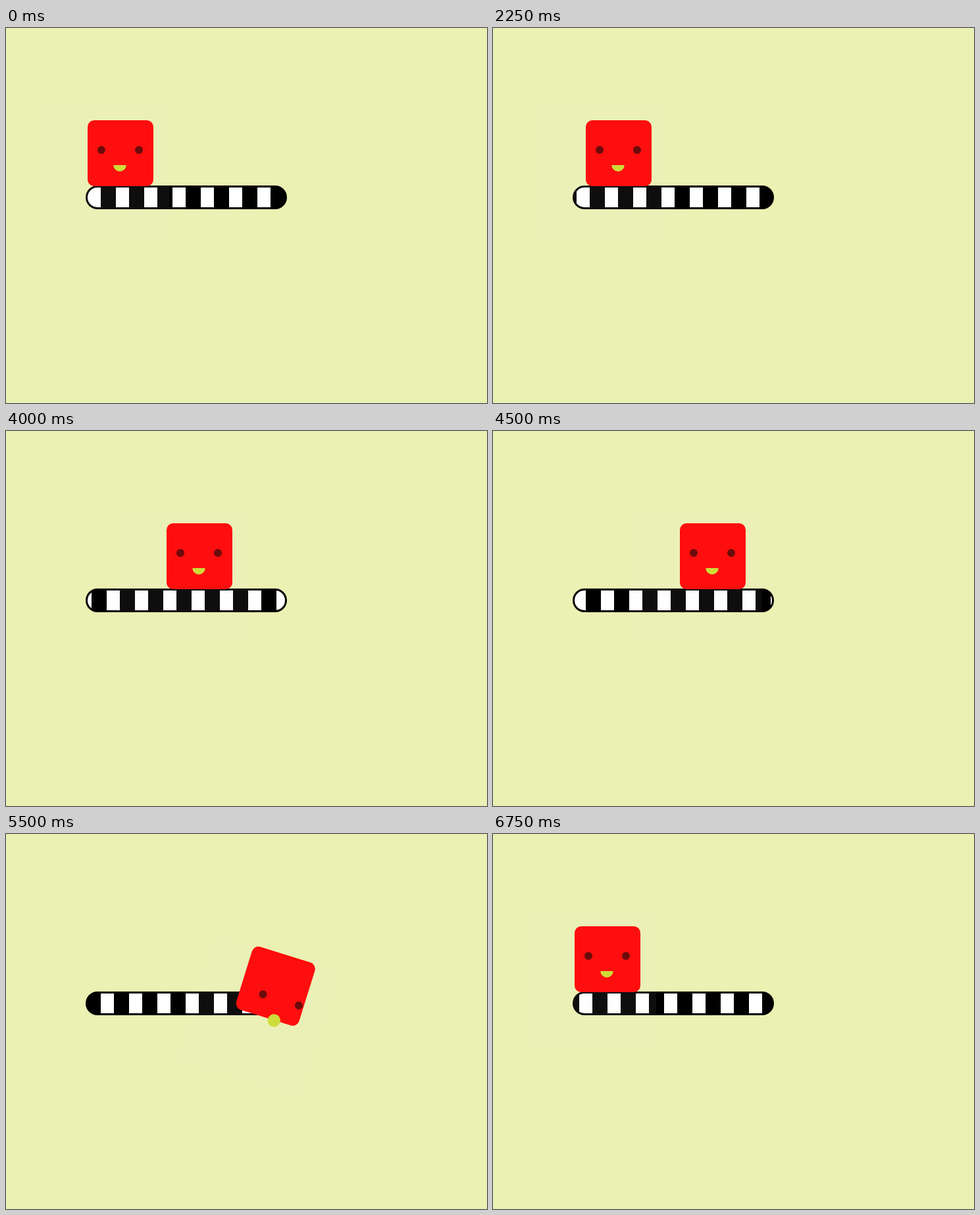
These frames come from a looping animation (731x569 px, 7000 ms). An HTML page with a canvas:

```html
<!DOCTYPE html>
<html lang="en">
<head>
<meta charset="utf-8">
<title>Box on a conveyor belt</title>
<style>
  html, body { margin: 0; height: 100%; overflow: hidden; background: #ebf0b3; }
  canvas { display: block; }
</style>
</head>
<body>
<canvas width="731" height="569"></canvas>
<script>
const ctx = document.querySelector('canvas').getContext('2d');
const LOOP = 7000, STEP = 250;
const RIDE = 1400, TIP = 5000, RESET = 6330;

const clamp = v => Math.min(1, Math.max(0, v));

// cubic-bezier(.42, 0, 1, 1)
function easeIn(p) {
  let low = 0, high = 1;
  for (let i = 0; i < 24; i++) {
    const s = (low + high) / 2;
    if (1.26 * s + 0.48 * s * s - 0.74 * s ** 3 < p) low = s; else high = s;
  }
  return low * low * (3 - 2 * low);
}

function pill(x, y, w, h, r) {
  ctx.beginPath();
  ctx.roundRect(x, y, w, h, r);
}

function dot(x, y, r, color, end = 2 * Math.PI) {
  ctx.fillStyle = color;
  ctx.beginPath();
  ctx.arc(x, y, r, 0, end);
  ctx.fill();
}

function place(x, y, angle, draw) {
  ctx.save();
  ctx.translate(x, y);
  ctx.rotate(angle);
  draw();
  ctx.restore();
}

function drawBelt(t) {
  const shift = Math.floor(t < 2750 ? 0.0208 * t : 6 + 0.0232 * (t - 3000));
  ctx.fillStyle = '#000';
  pill(121, 239, 306, 36, 18);
  ctx.fill();
  ctx.save();
  pill(124, 242, 300, 30, 15);
  ctx.clip();
  ctx.fillStyle = '#fff';
  for (let x = 124 + shift % 43 - 43; x < 424; x += 43) ctx.fillRect(x, 242, 20, 30);
  ctx.restore();
}

function drawBox() {
  ctx.fillStyle = '#f00';
  pill(-50, -50, 100, 100, 10);
  ctx.fill();
}

function drawFace(surprised) {
  ctx.fillStyle = 'rgba(238, 238, 238, .06)';
  ctx.fillRect(-100, -100, 200, 200);
  for (const x of [-3, 54]) dot(x, -35, 6, 'rgba(10, 10, 10, .6)');
  if (surprised) dot(25, -2, 9.7, '#cddc39');
  else dot(25, -12, 9.7, '#cddc39', Math.PI);
}

function render(t) {
  const active = t < RESET;
  const ride = active ? Math.round(205 * easeIn(clamp((t - RIDE) / (TIP - RIDE)))) : 0;
  const fall = active ? easeIn(clamp((t - TIP) / (RESET - TIP))) : 0;
  const angle = fall * Math.PI / 2;
  ctx.fillStyle = '#ebf0b3';
  ctx.fillRect(0, 0, 731, 569);
  drawBelt(t);
  place(174 + ride + 159 * fall, 190 + 212 * fall, angle, drawBox);
  place(148 + ride + 155 * fall, 220 + 298 * fall, angle, () => drawFace(active && t > 4900));
}

function tick() {
  render(Math.floor(performance.now() % LOOP / STEP) * STEP);
  requestAnimationFrame(tick);
}
tick();
</script>
</body>
</html>
```
